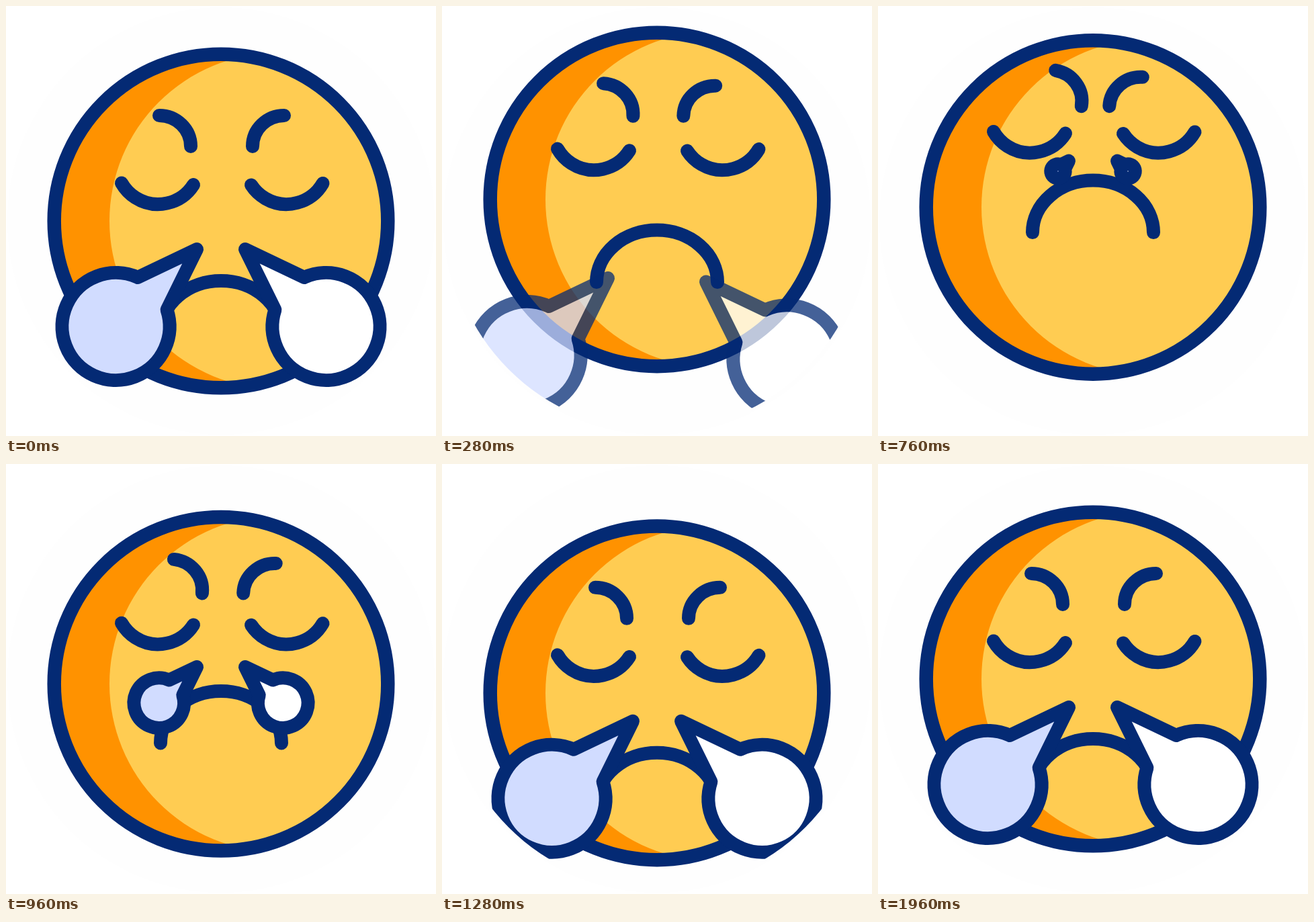
These frames come from a looping animation (640x640 px, 2 s). An HTML page with a canvas:

```html
<!DOCTYPE html>
<html lang="en">
<head>
<meta charset="utf-8">
<title>Huffing face</title>
<style>
  html, body { margin: 0; width: 100%; height: 100%; overflow: hidden; background: #fff; }
  canvas { display: block; width: 100vmin; height: 100vmin; }
</style>
</head>
<body>
<canvas id="stage" width="640" height="640"></canvas>
<script>
const SIZE = 640, MID = 320, LOOP = 2000, STEP = 40;
const NAVY = '#042a74', YELLOW = '#ffcc52', ORANGE = '#ff9200';
const ICE = '#d1dcff', WHITE = '#ffffff';
const LINE = 20;

const ctx = document.getElementById('stage').getContext('2d');
const layer = document.createElement('canvas');
layer.width = layer.height = SIZE;
const puffCtx = layer.getContext('2d');

const lerp = (a, b, k) => a + (b - a) * k;
const span = (t, a, b) => Math.min(1, Math.max(0, (t - a) / (b - a)));
const ease = (t, a, b) => {
  const k = span(t, a, b);
  return k * k * (3 - 2 * k);
};

function headY(t) {
  if (t < 455) return lerp(320, 275.5, ease(t, 0, 430));
  if (t < 1170) return lerp(275.5, 342, ease(t, 480, 1170));
  return lerp(342, 320, ease(t, 1170, 1960));
}

// How far the features are pulled up the face, 0 to 1
const liftAt = t => t < 740 ? ease(t, 0, 720) : 1 - ease(t, 750, 1240);

function pen(c, width = LINE) {
  c.strokeStyle = NAVY;
  c.lineWidth = width;
  c.lineCap = c.lineJoin = 'round';
}

function disc(x, y, r, fill) {
  ctx.beginPath();
  ctx.arc(x, y, r, 0, Math.PI * 2);
  ctx.fillStyle = fill;
  ctx.fill();
}

function drawHead(y) {
  disc(MID, y, 248, ORANGE);
  ctx.save();
  ctx.beginPath();
  ctx.arc(MID, y, 248, 0, Math.PI * 2);
  ctx.clip();
  disc(404, y, 250, YELLOW);
  ctx.restore();
  ctx.beginPath();
  ctx.arc(MID, y, 248.3, 0, Math.PI * 2);
  pen(ctx, 20.5);
  ctx.stroke();
}

// Circular arc hanging below (x, y) between two horizontal offsets
function drawEye(x, y, r, left, right) {
  ctx.beginPath();
  ctx.arc(x, y, r, Math.acos(right / r), Math.acos(left / r));
  ctx.stroke();
}

function drawBrow(x, y, side, turn) {
  ctx.save();
  ctx.translate(x, y);
  ctx.rotate(turn * Math.PI / 180);
  ctx.scale(side, 1);
  ctx.beginPath();
  ctx.ellipse(-23.5, 23, 47, 46, 0, -Math.PI / 2, 0);
  ctx.stroke();
  ctx.restore();
}

function drawMouth(y) {
  ctx.beginPath();
  ctx.ellipse(MID, y + 77.5, 90, 77.5, 0, Math.PI, Math.PI * 2);
  ctx.stroke();
}

// Puff of breath growing away from its tip; side 1 is left, -1 is right
function drawPuff(x, y, side, scale, fill) {
  const c = puffCtx;
  const at = (px, py) => c.lineTo(x + side * px * scale, y + py * scale);
  const cx = -120.5, cy = 115;
  const a = Math.atan2(42 - cy, -88 - cx);
  const b = Math.atan2(90 - cy, -44 - cx);
  c.beginPath();
  c.moveTo(x, y);
  at(-88, 42);
  c.save();
  c.translate(x, y);
  c.scale(side * scale, scale);
  c.arc(cx, cy, 80, a, b, true);
  c.restore();
  c.closePath();
  c.fillStyle = fill;
  c.fill();
  pen(c);
  c.stroke();
}

function drawPuffs(t, tipY) {
  let alpha = 1, scale = 1, dx = 0, left = tipY, right = tipY;
  if (t < 640) {
    const drift = ease(t, 0, 560);
    alpha = 1 - ease(t, 160, 520);
    dx = 74 * drift;
    left = 362 + 86 * drift;
    right = 362 + 97 * drift;
  } else {
    scale = span(t, 680, 1280);
  }
  if (alpha <= 0 || scale <= 0) return;
  puffCtx.clearRect(0, 0, SIZE, SIZE);
  drawPuff(284 - dx, left, 1, scale, ICE);
  drawPuff(356 + dx, right, -1, scale, WHITE);
  ctx.globalAlpha = alpha;
  ctx.drawImage(layer, 0, 0);
  ctx.globalAlpha = 1;
}

function draw(t) {
  const y = headY(t), lift = liftAt(t);
  ctx.fillStyle = WHITE;
  ctx.fillRect(0, 0, SIZE, SIZE);
  disc(MID, MID, 318, '#fefefe');

  ctx.save();
  ctx.beginPath();
  ctx.arc(MID, MID, 312.3, 0, Math.PI * 2);
  ctx.clip();

  drawHead(y);
  pen(ctx);
  const eyeY = y - 87.5 - 56 * lift;
  drawEye(226.3, eyeY, 62.5, -54.3, 52.7);
  drawEye(417.5, eyeY, 62.5, -52.5, 54);
  drawBrow(251.5 + 32 * lift, y - 134 - 43 * lift, 1, 9.8 * lift);
  drawBrow(390.5 - 21.5 * lift, y - 134 - 38 * lift, -1, 3.2 * lift);
  drawMouth(y + 89 - 129 * lift);
  drawPuffs(t, y + 42 - 111 * lift);

  ctx.restore();
}

const start = performance.now();
function tick() {
  const t = (performance.now() - start) % LOOP;
  draw(Math.floor(t / STEP) * STEP);
  requestAnimationFrame(tick);
}
tick();
</script>
</body>
</html>
```
